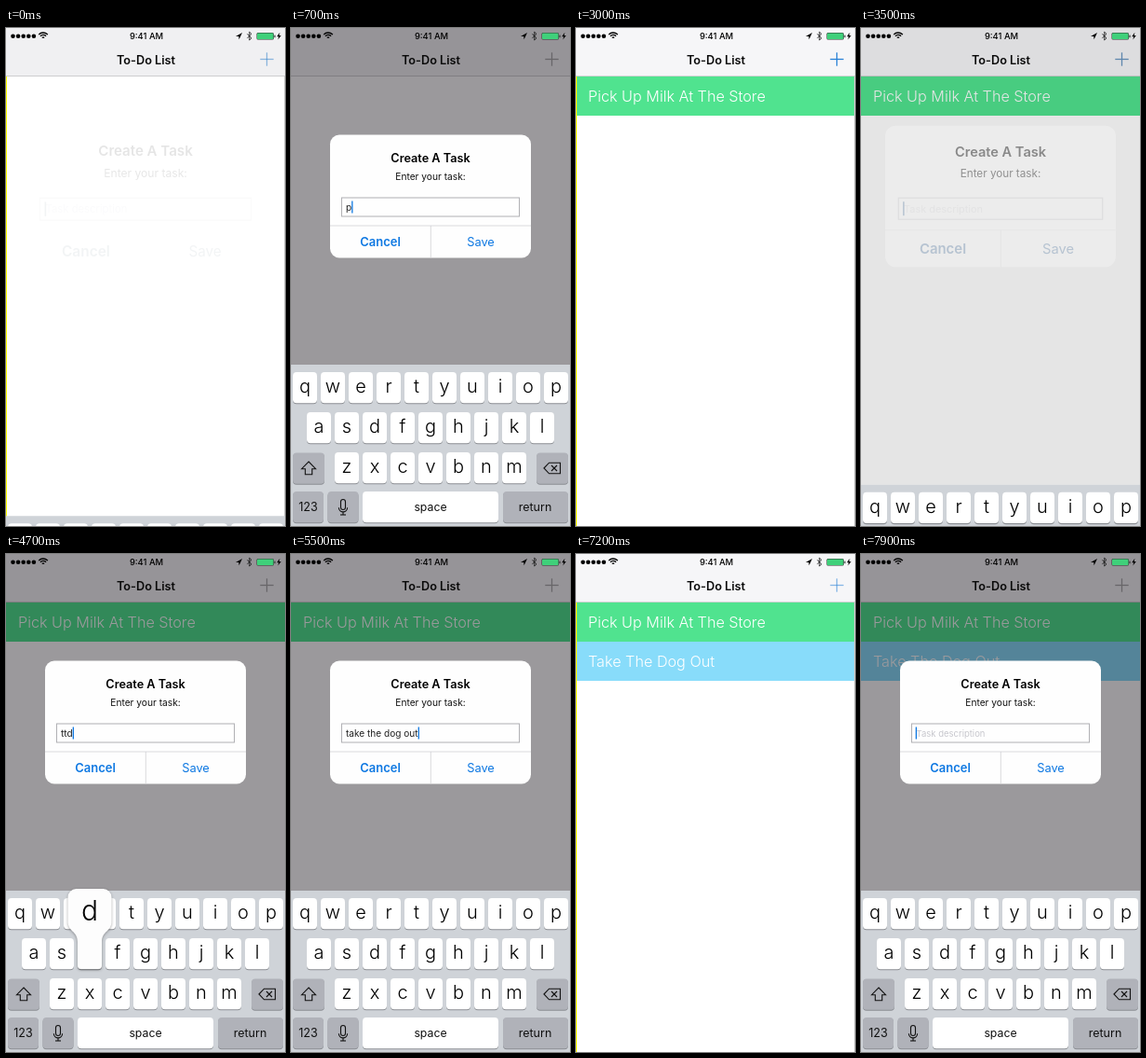
Animation of 300 by 534 pixels, one loop 8 s. Source, as an HTML page with a canvas:

```html
<!DOCTYPE html>
<html lang="en">
<head>
<meta charset="utf-8">
<title>To-Do List</title>
<style>
html, body { margin: 0; width: 100%; height: 100%; overflow: hidden; background: #fff; }
canvas { display: block; width: 300px; height: 534px; }
</style>
</head>
<body>
<canvas id="stage"></canvas>
<script>
const W = 300, H = 534, LOOP = 8000;
const canvas = document.getElementById('stage');
const ctx = canvas.getContext('2d');
const ratio = window.devicePixelRatio || 1;
canvas.width = W * ratio;
canvas.height = H * ratio;

const FONT = 'Inter, Roboto, sans-serif';
const GREY = [140, 146, 152], BLUE = [14, 120, 226];

// Each session opens the dialog, types a shortcut that expands on space, then saves.
const sessions = [
  { open: -84, save: 1900, text: 'pick up milk at the store',
    keys: [[540, 'p'], [880, 'u'], [1140, 'm'], [1400, 's'], [1680, ' ']] },
  { open: 3316, save: 5700, text: 'take the dog out',
    keys: [[4250, 't'], [4460, 't'], [4640, 'd'], [4930, 'o'], [5230, ' ']] },
  { open: 7330, save: Infinity, text: '', keys: [] }
];
const tasks = [
  { label: 'Pick Up Milk At The Store', color: '#50e38f', at: 2220 },
  { label: 'Take The Dog Out', color: '#88dcfa', at: 6060 }
];
const keyRows = [
  { letters: 'qwertyuiop', x: 15, y: 369 },
  { letters: 'asdfghjkl', x: 30, y: 412 },
  { letters: 'zxcvbnm', x: 60, y: 455 }
];

const clamp = v => Math.max(0, Math.min(1, v));
const ease = (t, start, length) => {
  const x = clamp((t - start) / length);
  return x * x * (3 - 2 * x);
};
const blend = (a, b, p) => `rgb(${a.map((v, i) => Math.round(v + (b[i] - v) * p))})`;

function text(str, x, y, size, weight, color, align = 'center') {
  ctx.font = `${weight} ${size}px ${FONT}`;
  ctx.textAlign = align;
  ctx.fillStyle = color;
  ctx.fillText(str, x, y);
}

function rect(x, y, w, h, color) {
  ctx.fillStyle = color;
  ctx.fillRect(x, y, w, h);
}

function box(x, y, w, h, r, color) {
  ctx.beginPath();
  ctx.roundRect(x, y, w, h, r);
  ctx.fillStyle = color;
  ctx.fill();
}

function path(points, color, width = 1, close = false) {
  ctx.beginPath();
  points.forEach(([x, y]) => ctx.lineTo(x, y));
  if (close) ctx.closePath();
  ctx.strokeStyle = color;
  ctx.lineWidth = width;
  ctx.stroke();
}

function fillPath(points, color) {
  ctx.beginPath();
  points.forEach(([x, y]) => ctx.lineTo(x, y));
  ctx.fillStyle = color;
  ctx.fill();
}

function drawStatus() {
  for (let i = 0; i < 5; i++) {
    ctx.beginPath();
    ctx.arc(7.5 + i * 5.6, 8.7, 2.3, 0, 7);
    ctx.fillStyle = '#000';
    ctx.fill();
  }
  ctx.strokeStyle = '#000';
  ctx.lineWidth = 1.3;
  for (const r of [6.6, 4.2, 1.6]) {
    ctx.beginPath();
    ctx.arc(40, 11.6, r, -Math.PI * 0.76, -Math.PI * 0.24);
    ctx.stroke();
  }
  text('9:41 AM', 151, 12, 9.4, 500, '#000');
  fillPath([[247, 9], [254, 5], [250.6, 12.3], [250.2, 9]], '#000');
  path([[259.3, 6.4], [264, 10.8], [261.7, 13], [261.7, 4.2], [264, 6.4], [259.3, 10.8]], '#111', 0.8);
  box(269.5, 5, 18.5, 7.6, 1.5, '#333');
  box(270, 5.5, 17.5, 6.6, 1.2, '#3fd07a');
  box(288.4, 7.4, 1.2, 2.8, 0.5, '#333');
  fillPath([[294.4, 4.8], [291.2, 9.2], [293.2, 9.2], [292.4, 12.6], [295.8, 7.9], [293.7, 7.9]], '#000');
}

function drawPage(t, dim, pressed) {
  rect(0, 0, W, H, '#fff');
  rect(0, 0, W, 51.5, '#f6f6f8');
  rect(0, 51.3, W, 0.7, '#c2c2c5');

  tasks.forEach((task, i) => {
    const shown = ease(t, task.at, 220);
    if (!shown) return;
    const y = 52 + i * 42;
    ctx.globalAlpha = shown;
    rect(0, y, W, 42, task.color);
    text(task.label, 13, y + 27, 16.2, 300, '#fff', 'left');
    ctx.globalAlpha = 1;
  });

  ctx.globalAlpha = pressed ? 0.55 : 1;
  const tint = blend([40, 130, 215], [170, 170, 170], clamp(dim * 2));
  path([[273.3, 33.5], [287.7, 33.5]], tint, 1.3);
  path([[280.5, 26.3], [280.5, 40.7]], tint, 1.3);
  ctx.globalAlpha = 1;

  // The list stays bright, with a coloured edge, until the shade is well under way.
  const shade = `rgba(5,0,8,${0.4 * dim})`;
  rect(0, 0, W, 52, shade);
  if (dim > 0.2) {
    rect(0, 52, W, H - 52, shade);
  } else {
    rect(0, 52, 1, H - 52, '#ff0');
    rect(299, 52, 1, H - 52, '#d0d0d0');
  }
  text('To-Do List', 150.5, 38.7, 12.7, 600, '#0a0a0a');
  drawStatus();
}

function drawDialog(value, rise, fade, caret) {
  const inkAlpha = clamp(rise * 1.65) * fade, paperAlpha = rise * fade;
  const scale = 1.2 - 0.2 * rise;
  const blue = blend(GREY, BLUE, rise);
  ctx.save();
  ctx.translate(150, 180.5);
  ctx.scale(scale, scale);
  ctx.translate(-150, -180.5);

  ctx.globalAlpha = paperAlpha;
  box(42, 114.5, 216, 132, 10, '#fefefe');
  ctx.strokeStyle = '#b0b0b4';
  ctx.lineWidth = 1;
  ctx.strokeRect(54.5, 182, 191, 20);
  if (paperAlpha > 0.2) {
    path([[42, 212], [258, 212]], '#d0d0d4', 0.8);
    path([[150.3, 212], [150.3, 246.5]], '#d0d0d4', 0.8);
  }
  if (!value) text('Task description', 59.5, 195.5, 9.5, 400, '#c7c7cd', 'left');

  ctx.globalAlpha = inkAlpha;
  text('Create A Task', 150, 143.6, 12.7, 600, '#000');
  text('Enter your task:', 150, 163, 10.2, 400, '#111');
  text('Cancel', 96, 234.4, 13, 600, blue);
  text('Save', 204, 234.4, 12.8, 400, blue);
  text(value, 59, 195.7, 10.1, 400, '#222', 'left');
  if (caret) {
    const end = value ? ctx.measureText(value).width + 0.3 : 0;
    rect(58.7 + end, 185.5, 1.3, 13, blue);
  }
  ctx.restore();
}

function key(x, y, w, color = '#fff') {
  box(x, y + 1, w, 33.3, 4, '#8a8d92');
  box(x, y, w, 33.2, 4, color);
}

function drawPopup(letter) {
  const row = keyRows.find(r => r.letters.includes(letter));
  const cx = row.x + row.letters.indexOf(letter) * 30;
  const top = row.y - 53, mid = row.y - 10, bottom = row.y + 33;
  const left = Math.max(2, Math.min(251, cx - 23.5)), right = left + 47;
  const l = cx - 13, r = cx + 13;
  ctx.save();
  ctx.shadowColor = 'rgba(0,0,0,.35)';
  ctx.shadowBlur = 3 * ratio;
  ctx.shadowOffsetY = ratio;
  ctx.beginPath();
  ctx.moveTo(left + 9, top);
  ctx.arcTo(right, top, right, mid, 9);
  ctx.lineTo(right, mid - 8);
  ctx.bezierCurveTo(right, mid + 3, r, mid + 2, r, mid + 14);
  ctx.arcTo(r, bottom, l, bottom, 4);
  ctx.arcTo(l, bottom, l, mid, 4);
  ctx.lineTo(l, mid + 14);
  ctx.bezierCurveTo(l, mid + 2, left, mid + 3, left, mid - 8);
  ctx.arcTo(left, top, right, top, 9);
  ctx.fillStyle = '#fdfdfd';
  ctx.fill();
  ctx.restore();
  text(letter, left + 23.5, top + 34, 30, 300, '#000');
}

function drawKeyboard(shift, active) {
  ctx.save();
  ctx.translate(0, shift);
  rect(0, 361, W, 180, '#cfd3d8');
  for (const row of keyRows) {
    [...row.letters].forEach((letter, i) => {
      const x = row.x + i * 30;
      key(x - 13, row.y, 26);
      text(letter, x, row.y + 22.3, 20, 300, '#000');
    });
  }

  const grey = '#b0b2b9';
  key(2, 455.5, 34, grey);
  key(264, 455.5, 34, grey);
  key(2, 497, 33, grey);
  key(39.5, 497, 33, grey);
  key(77, 497, 146, active === ' ' ? grey : '#fff');
  key(228, 497, 70, grey);
  text('123', 18.5, 517.8, 12.5, 400, '#111');
  text('space', 150, 517.5, 12.3, 400, '#111');
  text('return', 262.5, 517.5, 12.5, 400, '#111');

  path([[19, 465], [26.5, 472.7], [22.7, 472.7], [22.7, 478.7], [15.3, 478.7], [15.3, 472.7], [11.5, 472.7]], '#111', 1.1, true);
  path([[272, 472], [277.5, 466.2], [289.5, 466.2], [289.5, 477.8], [277.5, 477.8]], '#111', 1.1, true);
  path([[280, 469], [286, 475]], '#111', 1.1);
  path([[286, 469], [280, 475]], '#111', 1.1);

  ctx.strokeStyle = '#111';
  ctx.lineWidth = 1.1;
  ctx.beginPath();
  ctx.roundRect(53.5, 505.5, 5, 11, 2.5);
  ctx.stroke();
  ctx.beginPath();
  ctx.arc(56, 514.3, 4.6, 0, Math.PI);
  ctx.stroke();
  path([[56, 519], [56, 522]], '#111', 1.1);
  path([[53, 522], [59, 522]], '#111', 1.1);

  if (active && active !== ' ') drawPopup(active);
  ctx.restore();
}

function draw(t) {
  const s = sessions.filter(x => t >= x.open - 160).pop();
  const rise = ease(t, s.open, 560);
  const fade = 1 - ease(t, s.save, 260);
  const raised = rise * (1 - ease(t, s.save + 300, 300));
  const pressed = t > s.open - 160 && t < s.open + 150;

  const typed = s.keys.filter(k => t >= k[0]);
  const last = typed[typed.length - 1];
  const active = last && t - last[0] < 135 ? last[1] : '';
  const value = last && last[1] === ' ' ? s.text : typed.map(k => k[1]).join('');

  ctx.setTransform(ratio, 0, 0, ratio, 0, 0);
  drawPage(t, rise * fade, pressed);
  if (rise * fade > 0) drawDialog(value, rise, fade, t < s.save);
  if (raised > 0) drawKeyboard(173 * (1 - raised), active);
}

const began = performance.now();
function tick() {
  draw((performance.now() - began) % LOOP);
  requestAnimationFrame(tick);
}
tick();
</script>
</body>
</html>
```
